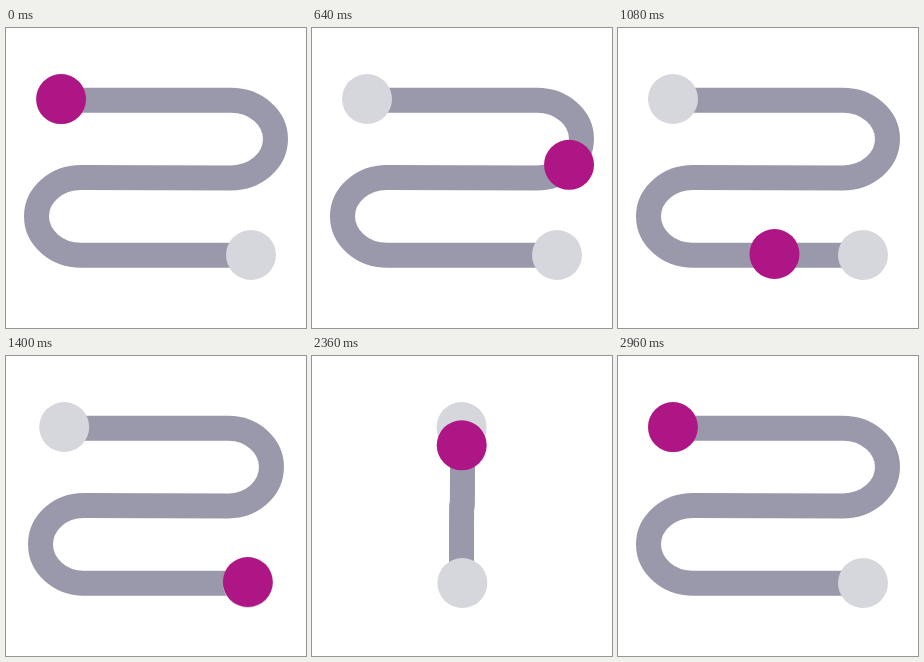
Write an HTML page that moves like this. It is 300 px wide and 300 px high and loops after 3000 ms.

```html
<!DOCTYPE html>
<html lang="en">
<head>
<meta charset="utf-8">
<title>Winding route</title>
<style>
html, body { margin: 0; width: 100%; height: 100%; overflow: hidden; background: #fff; }
svg { display: block; width: 100vw; height: 100vh; }
</style>
</head>
<body>
<svg viewBox="0 0 300 300">
  <path id="road" d="M55 72.3H225A44.5 38.8 0 0 1 225 149.9L75 149.5A44.5 38.85 0 0 0 75 227.2H245"
    fill="none" stroke="#9999ab" stroke-width="25" vector-effect="non-scaling-stroke"/>
  <circle id="top" cy="71" r="25" fill="#d6d7dc"/>
  <circle id="bottom" cy="227" r="25" fill="#d6d7dc"/>
  <circle id="ball" r="25" fill="#af1685"/>
</svg>
<script>
const LOOP = 3000, MID = 150, FLAT = 0.004;
const [road, topEnd, bottomEnd, ball] =
  ['road', 'top', 'bottom', 'ball'].map(id => document.getElementById(id));
const length = road.getTotalLength();
const start = road.getPointAtLength(0), end = road.getPointAtLength(length);

const mix = (a, b, p) => a + (b - a) * p;

// Progress of a cubic-bezier timing curve running from t0 to t1
function ease(t, t0, t1, [x1, y1, x2, y2]) {
  const u = (t - t0) / (t1 - t0);
  if (u <= 0) return 0;
  if (u >= 1) return 1;
  const curve = (a, b, s) => 3 * a * s * (1 - s) ** 2 + 3 * b * s * s * (1 - s) + s ** 3;
  let lo = 0, hi = 1;
  for (let i = 0; i < 30; i++) {
    const s = (lo + hi) / 2;
    if (curve(x1, x2, s) < u) lo = s; else hi = s;
  }
  return curve(y1, y2, lo);
}

const TRAVEL = [.6, .14, .77, 1], FOLD = [.95, 0, .05, 1], RISE = [.33, 0, .13, 1];

function draw(t) {
  const folded = ease(t, 1240, 1880, FOLD) - ease(t, 2600, 2960, FOLD);
  const k = mix(1, FLAT, folded);
  const squeeze = x => MID + (x - MID) * k;

  let p;
  if (t < 2000) {
    p = road.getPointAtLength(length * ease(t, 0, 1280, TRAVEL));
  } else {
    const up = ease(t, 2040, 2600, RISE);
    p = { x: mix(end.x, start.x, up), y: mix(end.y, start.y, up) };
  }

  road.setAttribute('transform', `matrix(${k} 0 0 1 ${MID * (1 - k)} 0)`);
  topEnd.setAttribute('cx', squeeze(start.x));
  bottomEnd.setAttribute('cx', squeeze(end.x));
  ball.setAttribute('cx', squeeze(p.x));
  ball.setAttribute('cy', p.y - 1.2);
}

const began = performance.now();
function tick() {
  draw((performance.now() - began) % LOOP);
  requestAnimationFrame(tick);
}
tick();
</script>
</body>
</html>
```
